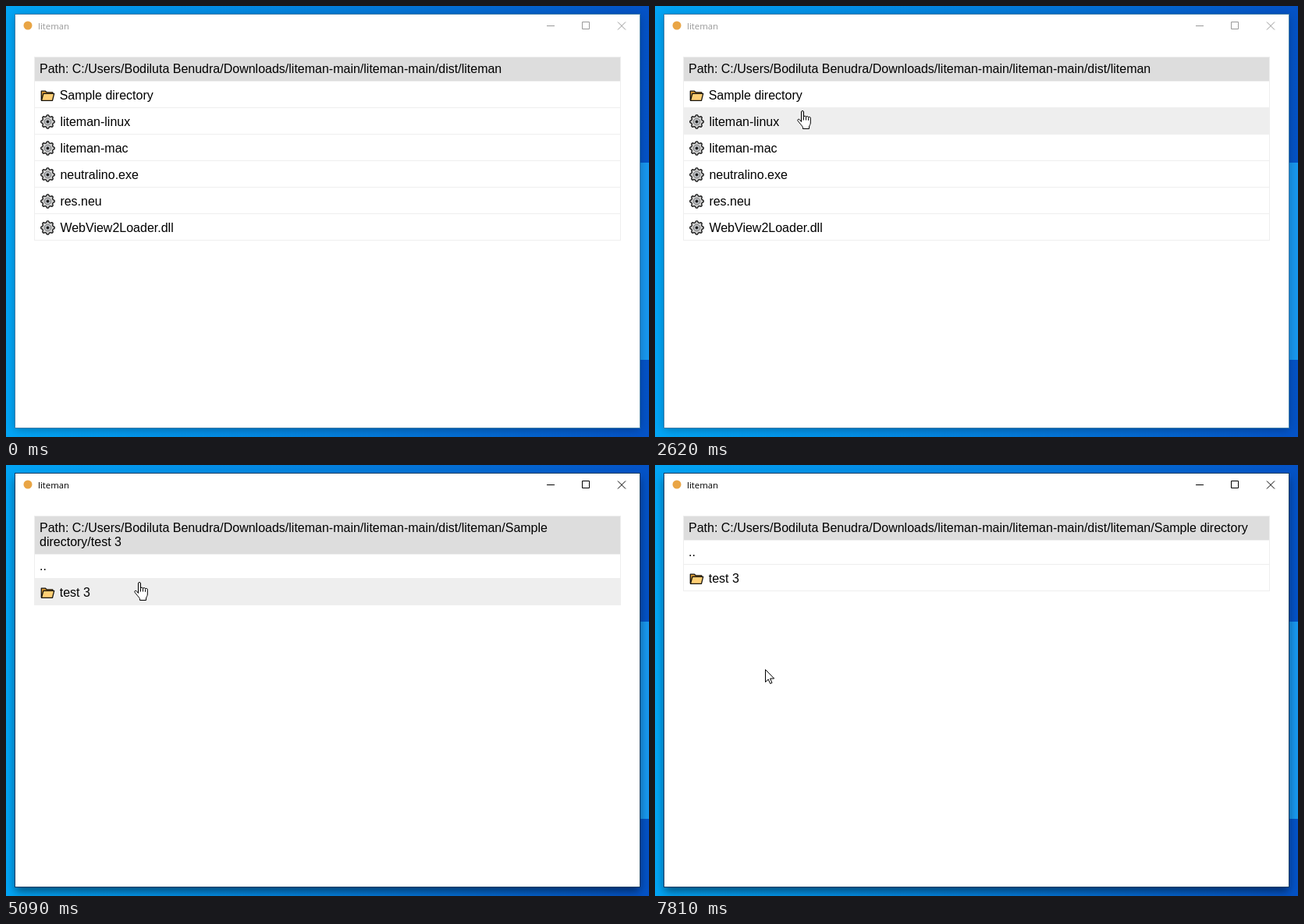
These frames come from a looping animation (824 px wide and 553 px high, 8 s). An HTML page:

```html
<!DOCTYPE html>
<html lang="en">
<head>
<meta charset="utf-8">
<title>liteman</title>
<style>
  html, body { margin: 0; width: 100%; height: 100%; overflow: hidden; }
  svg { display: block; width: 824px; height: 553px; }
  text { font: 16px "Liberation Sans", Arial, sans-serif; white-space: pre; }
  .title { font: 11.4px "Open Sans", "Noto Sans", sans-serif; }
</style>
</head>
<body>
<svg viewBox="0 0 824 553">
  <defs>
    <linearGradient id="sky">
      <stop offset="0" stop-color="#03a5f5"/>
      <stop offset=".5" stop-color="#0480dd"/>
      <stop offset="1" stop-color="#0452c6"/>
    </linearGradient>
    <filter id="blur" x="-10%" y="-10%" width="120%" height="120%">
      <feGaussianBlur stdDeviation="6"/>
    </filter>
    <g id="folder" stroke="#15120c" stroke-width="1.3" stroke-linejoin="round">
      <path d="M.8 13V1.2H6L7.6 2.8H15.3V5" fill="#d99a35"/>
      <path d="M1 13.3L3.4 4.3H17.2L15 13.3Z" fill="#ffcf75"/>
    </g>
    <g id="gear" stroke="#1c1c1c">
      <path id="teeth" fill="#d2d2d2" stroke-width="1.4" stroke-linejoin="round"/>
      <circle r="4.3" fill="#b9bcc0" stroke="#777" stroke-width="1"/>
      <circle r="1.5" fill="#111"/>
    </g>
    <path id="arrow" d="M.5 .5V16.5L4.2 13L6.7 18.5L9 17.5L6.6 12H11.7Z"/>
    <g id="hand">
      <path transform="translate(-7)" d="M5.5 14.5V2a1.5 1.5 0 0 1 3 0V8.5a1.5 1.5 0 0 1 3 .3a1.5 1.5 0 0 1 3 .6a1.4 1.4 0 0 1 2.8 .8V16c0 2-1.5 3.5-1.8 5V23.5H7.5V21.5C6 19 2.5 15.5 1 13.2c-.8-1.4 .9-2.6 2.2-1.6z"/>
      <path transform="translate(-7)" fill="none" d="M8.5 8.5v4M11.5 9v3.5M14.5 9.8v3"/>
    </g>
  </defs>

  <rect width="824" height="553" fill="url(#sky)"/>
  <rect x="812" y="201" width="253" height="253" fill="#1897ee"/>
  <rect id="shadow" x="12" width="800" height="530" filter="url(#blur)"/>
  <rect id="frame" x="11" y="10" width="802" height="532"/>
  <rect x="12" y="11" width="800" height="530" fill="#fff"/>

  <circle cx="28" cy="25" r="5.5" fill="#e9a545"/>
  <text id="title" class="title" x="41" y="30">liteman</text>
  <path id="buttons" fill="none" d="M693 25.5H703M738.5 20.5H747.5V29.5H738.5ZM784 20.5L794 30.5M794 20.5L784 30.5"/>

  <g id="table"></g>
  <use id="cursor" fill="#fff" stroke="#000" stroke-linejoin="round"/>
</svg>

<script>
const $ = id => document.getElementById(id);
const LOOP = 8000, LEFT = 37, WIDTH = 750, TOP = 66;

const root = "C:/Users/Bodiluta Benudra/Downloads/liteman-main/liteman-main/dist/liteman";
const paths = {
  home: ["Path: " + root],
  sample: ["Path: " + root + "/Sample directory"],
  test: ["Path: " + root + "/Sample", "directory/test 3"]
};
const homeFiles = ["Sample directory/", "liteman-linux", "liteman-mac",
  "neutralino.exe", "res.neu", "WebView2Loader.dll"];
const sampleFiles = ["..", "test 3/"];
const testFiles = ["..", "index.html"];

// The pinned row keeps its highlight until the list is rebuilt.
const views = [
  { at: 0, path: paths.home, files: homeFiles },
  { at: 3250, path: paths.sample, files: ["..", ...homeFiles], pinned: 1 },
  { at: 3550, path: paths.sample, files: sampleFiles },
  { at: 5090, path: paths.test, files: sampleFiles },
  { at: 5170, path: paths.test, files: testFiles },
  { at: 7100, path: paths.sample, files: testFiles },
  { at: 7190, path: paths.sample, files: sampleFiles }
];
const FOCUS_AT = 3100;

// Pointer moves: number of steps and [time, x, y] waypoints.
const moves = [
  { steps: 9, keys: [[280, 757, 541], [520, 630, 505], [900, 430, 449]] },
  { steps: 10, keys: [[1610, 422, 440], [1760, 340, 335], [1990, 210, 169], [2290, 190, 138]] },
  { steps: 3, keys: [[2620, 189, 134], [2770, 188, 125]] },
  { steps: 6, keys: [[3550, 187, 128], [3940, 174, 178]] },
  { steps: 6, keys: [[4090, 174, 174], [4170, 173, 164], [4480, 171, 150]] },
  { steps: 5, keys: [[5630, 172, 163], [5790, 160, 225], [5950, 148, 275]] },
  { steps: 8, keys: [[6410, 148, 268], [6570, 143, 215], [6790, 137, 139], [6960, 139, 121]] },
  { steps: 6, keys: [[7420, 139, 128], [7810, 141, 262]] }
];

function gearPath() {
  const points = [];
  for (let i = 0; i < 32; i++) {
    const angle = (i - .5) * Math.PI / 16;
    const radius = i % 4 < 2 ? 8.7 : 7;
    points.push((radius * Math.cos(angle)).toFixed(2) + " " + (radius * Math.sin(angle)).toFixed(2));
  }
  return "M" + points.join("L") + "Z";
}

function pointerAt(t) {
  const move = moves.filter(m => m.keys[0][0] <= t).pop();
  if (!move) return null;
  const { keys, steps } = move;
  const start = keys[0][0], end = keys[keys.length - 1][0];
  const pace = (end - start) / (steps - 1);
  const time = Math.min(end, start + Math.floor((t - start) / pace + .2) * pace);
  const next = Math.max(1, keys.findIndex(k => k[0] >= time - .01));
  const [a, b] = [keys[next - 1], keys[next]];
  const p = (time - a[0]) / (b[0] - a[0]);
  return { x: Math.round(a[1] + (b[1] - a[1]) * p), y: Math.round(a[2] + (b[2] - a[2]) * p) };
}

const rect = (x, y, w, h, fill) => `<rect x="${x}" y="${y}" width="${w}" height="${h}" fill="${fill}"/>`;
const label = (x, y, s) => `<text x="${x}" y="${y}">${s}</text>`;

function layout({ path, files }) {
  let y = TOP + 13 + 18 * path.length;
  return files.map(name => {
    const row = { name, y, h: name === ".." ? 31 : 34 };
    y += row.h;
    return row;
  });
}

function rowMarkup({ name, y, h }, hovered) {
  const back = hovered ? rect(LEFT, y, WIDTH, h, "#eee") : rect(LEFT, y + h - 1, WIDTH, 1, "#eee");
  if (name === "..") return back + label(43, y + 20, name);
  if (name.endsWith("/")) {
    return back + `<use href="#folder" x="44.5" y="${y + 11}"/>` + label(68.7, y + 23, name.slice(0, -1));
  }
  return back + `<use href="#gear" x="53.5" y="${y + 17.5}"/>` + label(69.4, y + 23, name);
}

function tableMarkup(view, rows, hover) {
  const last = rows[rows.length - 1], bottom = last.y + last.h;
  return rect(36, TOP - 1, 752, bottom - TOP + 1, "#eee") +
    rect(LEFT, rows[0].y, WIDTH, bottom - rows[0].y, "#fff") +
    rect(LEFT, TOP, WIDTH, rows[0].y - TOP - 1, "#ddd") +
    view.path.map((line, i) => label(43, 86 + 18 * i, line)).join("") +
    rows.map((row, i) => rowMarkup(row, i === hover)).join("");
}

function set(id, attrs) {
  for (const key in attrs) $(id).setAttribute(key, attrs[key]);
}

let lastTable = "";
function draw(t) {
  const active = t >= FOCUS_AT;
  const ink = active ? "#000" : "#999";
  set("title", { fill: ink });
  set("buttons", { stroke: ink });
  set("shadow", { y: active ? 17 : 13, opacity: active ? .5 : .3 });
  set("frame", { fill: active ? "#0b3b63" : "#3f7ca8" });

  const view = views.filter(v => v.at <= t).pop();
  const rows = layout(view);
  const pointer = pointerAt(t);
  const under = pointer ? rows.findIndex(r => pointer.y >= r.y && pointer.y < r.y + r.h) : -1;
  const table = tableMarkup(view, rows, view.pinned ?? under);
  if (table !== lastTable) $("table").innerHTML = lastTable = table;

  set("cursor", { visibility: pointer ? "visible" : "hidden" });
  if (pointer) set("cursor", { href: under < 0 ? "#arrow" : "#hand", x: pointer.x, y: pointer.y });
}

$("teeth").setAttribute("d", gearPath());
const begin = performance.now();
function tick() {
  draw((performance.now() - begin) % LOOP);
  requestAnimationFrame(tick);
}
tick();
</script>
</body>
</html>
```
